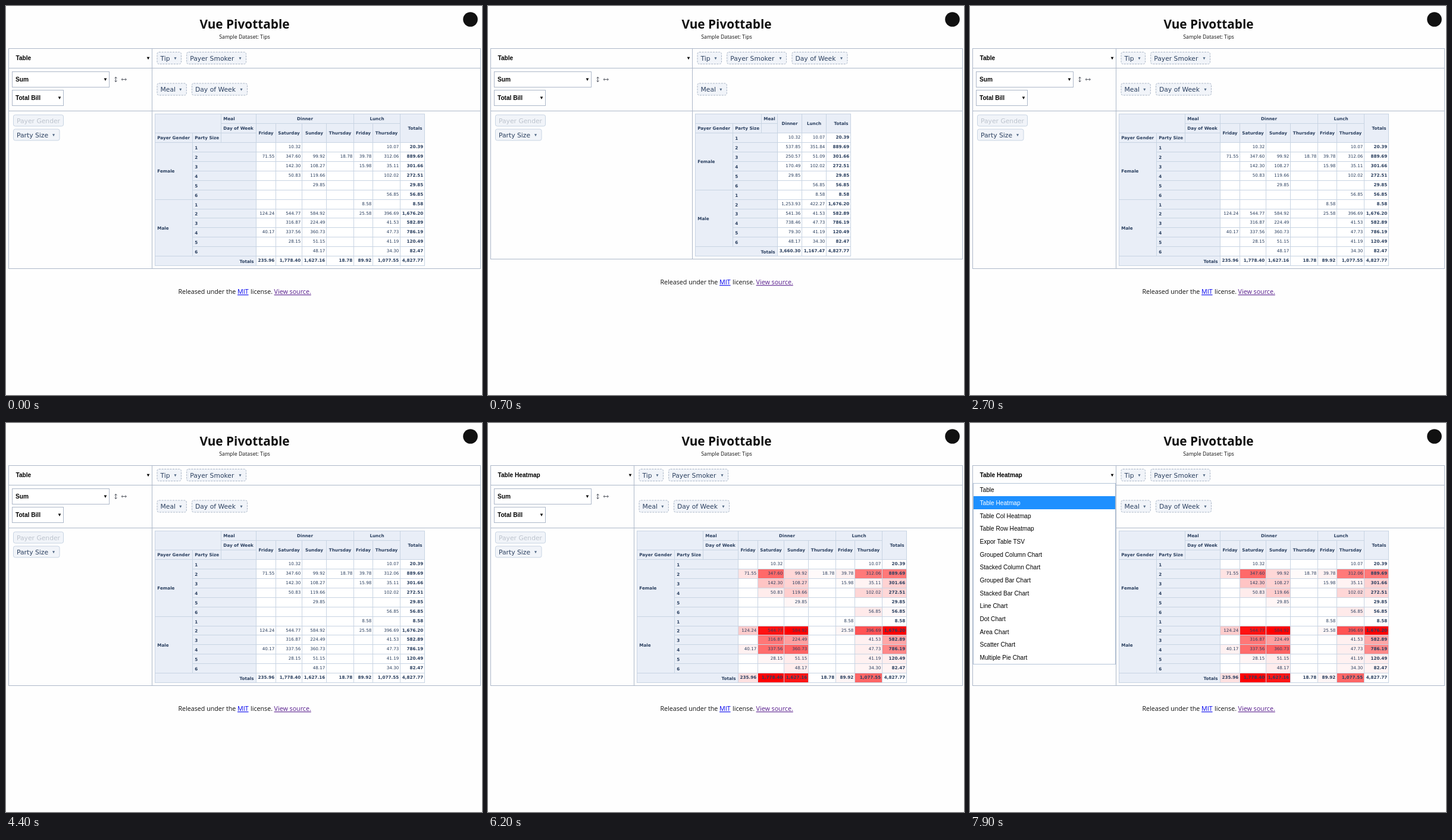
Write an HTML page that moves like this. It is 800 by 654 pixels and loops after 8000 ms.

```html
<!DOCTYPE html>
<html lang="en">
<head>
<meta charset="utf-8">
<title>Vue Pivottable</title>
<style>
  html, body { margin: 0; width: 100%; height: 100%; overflow: hidden; background: #fefefe; }
  svg { display: block; width: 800px; height: 654px; }
  .page { font-family: "Open Sans", "Noto Sans", sans-serif; fill: #111; }
  .foot { font-size: 10.7px; }
  .link { text-decoration: underline; text-decoration-thickness: 1px; text-underline-offset: 1px; }
  .ui { font-family: "Liberation Sans", Arial, sans-serif; font-size: 10.15px; fill: #000; }
  .chip { font-family: "DejaVu Sans", Verdana, sans-serif; font-size: 10.75px; fill: #2a3f5f; }
  .cell { font-family: "DejaVu Sans", Verdana, sans-serif; font-size: 7.2px; fill: #2a3f5f; }
  .b { font-weight: 700; }
  .off { fill: #bcc3cd; }
  rect, .line { shape-rendering: crispEdges; }
  rect.pill { shape-rendering: auto; }
</style>
</head>
<body>
<svg id="stage" viewBox="0 0 800 654"></svg>
<script>
const FRAME = '#adb8c9', GRID = '#c8d4e3', HEAD = '#e9eef7';
const LOOP = 8000;
const ROW = 15.95, TOP = 181.5;

const MENU = ['Table', 'Table Heatmap', 'Table Col Heatmap', 'Table Row Heatmap', 'Expor Table TSV',
  'Grouped Column Chart', 'Stacked Column Chart', 'Grouped Bar Chart', 'Stacked Bar Chart',
  'Line Chart', 'Dot Chart', 'Area Chart', 'Scatter Chart', 'Multiple Pie Chart'];
const DAYS = ['Friday', 'Saturday', 'Sunday', 'Thursday', 'Friday', 'Thursday'];

// Total bill by gender and party size (rows), meal and day (columns).
const BILLS = [
  [0, 10.32, 0, 0, 0, 10.07],
  [71.55, 347.6, 99.92, 18.78, 39.78, 312.06],
  [0, 142.3, 108.27, 0, 15.98, 35.11],
  [0, 50.83, 119.66, 0, 0, 102.02],
  [0, 0, 29.85, 0, 0, 0],
  [0, 0, 0, 0, 0, 56.85],
  [0, 0, 0, 0, 8.58, 0],
  [124.24, 544.77, 584.92, 0, 25.58, 396.69],
  [0, 316.87, 224.49, 0, 0, 41.53],
  [40.17, 337.56, 360.73, 0, 0, 47.73],
  [0, 28.15, 51.15, 0, 0, 41.19],
  [0, 0, 48.17, 0, 0, 34.3]
];

const sum = list => list.reduce((a, b) => a + b, 0);
const money = v => v ? v.toLocaleString('en-US', { minimumFractionDigits: 2, maximumFractionDigits: 2 }) : '';
const rowY = i => TOP + Math.round(i * ROW);

const text = (x, y, str, cls, extra = '') => `<text x="${x}" y="${y}" class="${cls}" ${extra}>${str}</text>`;
const box = (x1, y1, x2, y2, fill, stroke, extra = '') =>
  `<rect x="${x1}" y="${y1}" width="${x2 - x1}" height="${y2 - y1}" fill="${fill}" stroke="${stroke}" ${extra}/>`;
const line = d => `<path class="line" d="${d}" fill="none" stroke="${FRAME}"/>`;
const arrow = (x, y, r, fill) => `<path d="M${x - r} ${y - r}h${2 * r}l${-r} ${2 * r}z" fill="${fill}"/>`;
const anchor = a => `text-anchor="${a}"`;

function chip(x, cy, w, label, style = 'dashed') {
  const faded = style === 'faded', dashed = style === 'dashed';
  const h = dashed ? 20 : 19;
  const edge = dashed ? 'stroke-dasharray="3 1.6"' : '';
  return box(x, cy - h / 2, x + w, cy + h / 2, '#f1f4f9', dashed ? '#a9b5c6' : GRID, `class="pill" rx="3" ${edge}`) +
    text(x + 5.5, cy + 4, label, faded ? 'chip off' : 'chip') +
    (faded ? '' : arrow(x + w - 10, cy + 0.7, 2, '#506784'));
}

function select(x, y, w, h, label) {
  return box(x, y, x + w, y + h, '#fff', FRAME) +
    text(x + 5.5, y + h / 2 + 3.7, label, 'ui b') + arrow(x + w - 6.5, y + h / 2 + 0.3, 2.3, '#000');
}

// Header cell: align is start, middle or end.
function head(x1, y1, x2, y2, label = '', align = 'start', drop = 2.6) {
  const x = { start: x1 + 3.8, middle: (x1 + x2) / 2, end: x2 - 4 }[align];
  return box(x1, y1, x2, y2, HEAD, GRID) +
    text(x, (y1 + y2) / 2 + drop, label, 'cell b', anchor(align));
}

function value(x1, y1, x2, y2, v, bold, fill) {
  return box(x1, y1, x2, y2, fill, GRID) +
    text(x2 - 2.2, y1 + 9.7, money(v), bold ? 'cell b' : 'cell', anchor('end'));
}

// White to red between the smallest and largest number of a group.
function redScale(values) {
  const used = values.filter(v => v), lo = Math.min(...used), hi = Math.max(...used);
  return v => {
    const c = v ? 255 - Math.round(255 * (v - lo) / (hi - lo)) : 255;
    return `rgb(255,${c},${c})`;
  };
}

function headers(wide, xs, n) {
  const y = rowY, last = xs.length - 1;
  let out = head(xs[0], y(0), xs[2], y(n - 1)) + head(xs[2], y(0), xs[3], y(1), 'Meal');
  if (wide) {
    out += head(xs[3], y(0), xs[7], y(1), 'Dinner', 'middle') + head(xs[7], y(0), xs[9], y(1), 'Lunch', 'middle') +
      head(xs[2], y(1), xs[3], y(2), 'Day of Week') +
      DAYS.map((d, i) => head(xs[3 + i], y(1), xs[4 + i], y(3), d, 'middle')).join('');
  } else {
    out += head(xs[3], y(0), xs[4], y(2), 'Dinner', 'middle') + head(xs[4], y(0), xs[5], y(2), 'Lunch', 'middle');
  }
  return out + head(xs[last - 1], y(0), xs[last], y(n), 'Totals', 'end') +
    head(xs[0], y(n - 1), xs[1], y(n), 'Payer Gender') + head(xs[1], y(n - 1), xs[2], y(n), 'Party Size') +
    head(xs[2], y(n - 1), xs[3], y(n));
}

function pivot(wide, heat) {
  const xs = wide
    ? [250.5, 313.5, 361.5, 420.5, 453.5, 497.5, 538.5, 584.5, 616.5, 662.5, 703.5]
    : [348.5, 411.5, 459.5, 486.5, 527.5, 568.5, 609.5];
  const data = wide ? BILLS : BILLS.map(r => [sum(r.slice(0, 4)), sum(r.slice(4))]);
  const n = wide ? 3 : 2, end = n + data.length, cols = data[0].length;
  const rowSums = data.map(sum), colSums = data[0].map((_, c) => sum(data.map(r => r[c])));
  const white = () => '#fff';
  const tint = list => heat ? redScale(list) : white;
  const cellTint = tint(data.flat()), rowTint = tint(rowSums), colTint = tint(colSums);

  let out = headers(wide, xs, n) +
    head(xs[0], rowY(n), xs[1], rowY(n + 6), 'Female') + head(xs[0], rowY(n + 6), xs[1], rowY(end), 'Male');
  data.forEach((r, i) => {
    const y1 = rowY(n + i), y2 = rowY(n + i + 1);
    out += head(xs[1], y1, xs[3], y2, i % 6 + 1, 'start', 3.2);
    r.forEach((v, c) => out += value(xs[3 + c], y1, xs[4 + c], y2, v, false, cellTint(v)));
    out += value(xs[3 + cols], y1, xs[4 + cols], y2, rowSums[i], true, rowTint(rowSums[i]));
  });
  const y1 = rowY(end), y2 = rowY(end + 1);
  out += head(xs[0], y1, xs[3], y2, 'Totals', 'end', 3.2);
  colSums.forEach((v, c) => out += value(xs[3 + c], y1, xs[4 + c], y2, v, true, colTint(v)));
  return out + value(xs[3 + cols], y1, xs[4 + cols], y2, sum(rowSums), true, '#fff');
}

function menu(active) {
  const pitch = 21.69, first = 112.6;
  return box(5.5, 101.5, 244.5, 405.5, '#fff', '#b4c4d8') + MENU.map((label, i) => {
    const cy = first + i * pitch, on = i === active;
    return (on ? box(6, Math.round(cy - 10.8), 244, Math.round(cy + 10.8), '#1e90ff', 'none') : '') +
      text(16.5, cy + 3.6, label, 'ui', on ? 'style="fill:#fff"' : '');
  }).join('');
}

function footer(y) {
  const link = (x, label, color) => text(x, y, label, 'page foot link', `style="fill:${color}"`);
  return text(289.5, y, 'Released under the', 'page foot') + link(389, 'MIT', '#0000ee') +
    text(411, y, 'license.', 'page foot') + link(450.6, 'View source.', '#551a8b');
}

function scene({ wide, heat, title, active }) {
  const dx = wide ? 0 : 98, split = 245.5 + dx, bottom = wide ? 441.5 : 425.5;
  const day = wide ? [312.5, 140] : [511, 87.5];
  return text(401, 38, 'Vue Pivottable', 'page b', `font-size="20.8" ${anchor('middle')}`) +
    text(401, 55, 'Sample Dataset: Tips', 'page', `font-size="8.8" ${anchor('middle')}`) +
    '<circle cx="780.5" cy="22.5" r="12.3" fill="#111"/>' +
    box(4.5, 71.5, 797.5, bottom, 'none', FRAME) +
    line(`M4.5 104.5H797.5M4.5 176.5H797.5M${split} 71.5V${bottom}`) +
    text(16.5, 91.2, MENU[title], 'ui b') + arrow(split - 6.5, 88, 2.3, '#000') +
    select(10.5, 110.5, 163, 26, 'Sum') + select(10.5, 141.5, 86, 26, 'Total Bill') +
    `<path d="M184.5 119.5v8M182.5 121.5l2-2.2 2 2.2M182.5 125.5l2 2.2 2-2.2M194.2 123.5h8M196.2 121.5l-2.2 2 2.2 2M200.2 121.5l2.2 2-2.2 2" fill="none" stroke="#4a4f58" stroke-width=".9"/>` +
    chip(254 + dx, 87.5, 40.5, 'Tip') + chip(303.7 + dx, 87.5, 99.8, 'Payer Smoker') +
    chip(254 + dx, 140, 49.3, 'Meal') + chip(...day, 93, 'Day of Week') +
    chip(12.5, 192.5, 84, 'Payer Gender', 'faded') + chip(12.5, 216.5, 77.5, 'Party Size', 'solid') +
    pivot(wide, heat) + footer(bottom + 42.7) + (active >= 0 ? menu(active) : '');
}

const within = (t, a, b) => t >= a && t < b;

function stateAt(t) {
  const open = within(t, 4500, 5900) || t >= 7200;
  return {
    wide: !within(t, 400, 2300),
    heat: t >= 5900,
    title: t >= 5500 ? 1 : 0,
    active: open ? (t >= 5400 ? 1 : 0) : -1
  };
}

const stage = document.getElementById('stage');
const start = performance.now();
let shown = '';

function draw() {
  const state = stateAt((performance.now() - start) % LOOP);
  const key = JSON.stringify(state);
  if (key !== shown) {
    stage.innerHTML = scene(state);
    shown = key;
  }
  requestAnimationFrame(draw);
}
draw();
</script>
</body>
</html>
```
